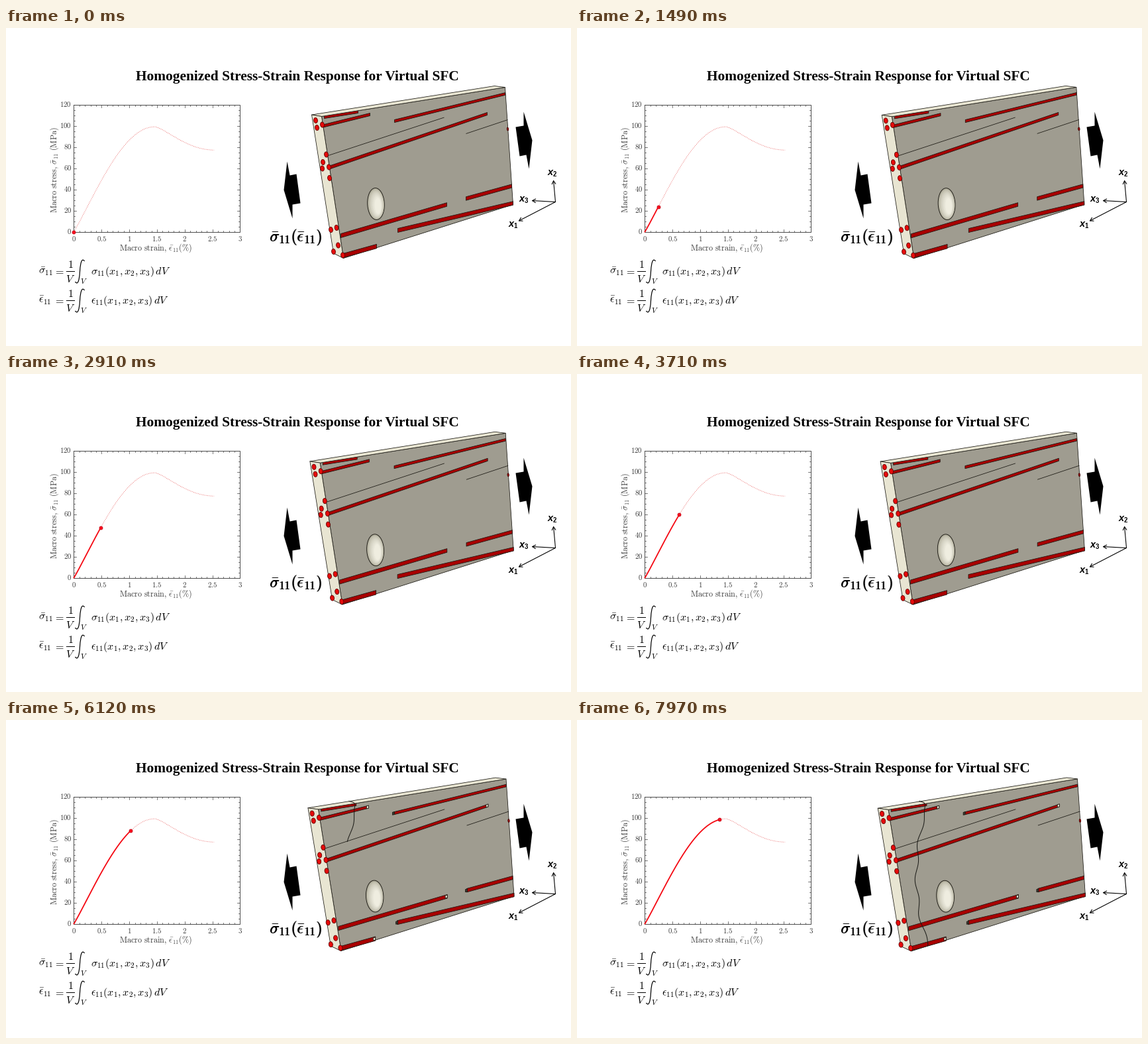
These frames come from a looping animation (853 by 480 pixels, 8 s). A matplotlib script:

```python
import numpy as np
import matplotlib.pyplot as plt
from matplotlib.animation import FuncAnimation
from matplotlib.colors import to_rgb
from matplotlib.patches import PathPatch, Polygon
from matplotlib.path import Path

W, H, DPI = 853, 480, 64
FRAMES, INTERVAL, POSES = 200, 40, 107
PX = 72 / DPI  # points per pixel

INK, GRAY, EDGE = "black", "#3c3c3c", "#1c1a14"
FACE, CREAM, DARK_RED, RED = "#9f9c90", "#e8e5d2", "#a80000", "#e60a0a"

fig = plt.figure(figsize=(W / DPI, H / DPI), dpi=DPI, facecolor="white")
ax = fig.add_axes([0, 0, 1, 1])
ax.set_xlim(-0.5, W - 0.5)  # whole numbers fall on pixel centres
ax.set_ylim(H - 0.5, -0.5)
ax.axis("off")


def line(xs, ys, color=INK, width=1.0, **kw):
    return ax.plot(xs, ys, color=color, lw=width * PX, **kw)[0]


def text(x, y, s, size, color=INK, va="baseline", **kw):
    return ax.text(x, y, s, fontsize=size * PX, color=color, va=va,
                   math_fontfamily="cm", **kw)


# ---------- title ----------
text(439, 78, "Homogenized Stress-Strain Response for Virtual SFC", 21.33,
     ha="center", family="Liberation Serif", weight="bold")

# ---------- chart ----------
LEFT, RIGHT, TOP, BOTTOM = 102, 353, 115, 307
PEAK, LAST = 1.46, 2.53


def to_px(strain, stress):
    return LEFT + (RIGHT - LEFT) * strain / 3, BOTTOM + (TOP - BOTTOM) * stress / 120


def stress_at(strain):
    """Sine-like rise to 99 MPa, then a softening tail that levels out at 77 MPa."""
    rise = 99 * np.sin(np.pi / 2 * np.clip(strain / PEAK, 0, 1)) ** 1.06
    tail = np.clip((strain - PEAK) / 1.09, 0, 1) ** 0.7
    return np.where(strain < PEAK, rise, 88 + 11 * np.cos(np.pi * tail))


def curve(end, n=300):
    strain = np.linspace(0, end, n)
    return to_px(strain, stress_at(strain))


line([LEFT, RIGHT, RIGHT, LEFT, LEFT], [TOP, TOP, BOTTOM, BOTTOM, TOP], GRAY, 0.9)
for i in range(1, 30):
    x, size = to_px(i / 10, 0)[0], 2 if i % 5 else 4
    line([x, x], [BOTTOM, BOTTOM - size], GRAY, 0.7)
    line([x, x], [TOP, TOP + size], GRAY, 0.7)
for i in range(1, 24):
    y, size = to_px(0, 5 * i)[1], 2 if i % 4 else 4
    line([LEFT, LEFT + size], [y, y], GRAY, 0.7)
    line([RIGHT, RIGHT - size], [y, y], GRAY, 0.7)
for i in range(7):
    x, y = to_px(i / 2, 20 * i)
    text(x, 321, f"${i / 2:g}$", 10.8, GRAY, ha="center")
    text(98.5, y + 3.7, f"${20 * i}$", 10.8, GRAY, ha="right")
text(225.5, 335, r"$\mathrm{Macro\ strain},\,\bar{\epsilon}_{11}(\%)$", 12.2, GRAY,
     ha="center")
text(72.5, 214, r"$\mathrm{Macro\ stress},\,\bar{\sigma}_{11}\ (\mathrm{MPa})$", 12.2,
     GRAY, va="center", ha="center", rotation=90)

line(*curve(LAST), "#e95a5a", 0.9, linestyle=(0, (1, 1.7)))
trace = line([], [], "#f50a14", 1.8, zorder=5)
head = line([], [], marker="o", markersize=5 * PX, markerfacecolor="#ff1020",
            markeredgecolor="#c00010", markeredgewidth=0.9, zorder=6)


# ---------- formulas ----------
def integral_sign(x, y):
    half = np.array([(7, -15.5), (4, -20), (1, -17)])
    verts = np.vstack([half, [(0, 0)], -half[::-1]]) + (x, y)
    ax.add_patch(PathPatch(Path(verts, [Path.MOVETO] + [Path.CURVE4] * 6),
                           fill=False, lw=1.2 * PX))


def average(symbol, y):
    text(49, y, rf"$\bar{{{symbol}}}_{{11}}$", 16)
    text(80, y, "$=$", 16, ha="center")
    text(97, y - 10, "$1$", 16, ha="center")
    text(97, y + 12, "$V$", 16, ha="center")
    line([91, 103], [y - 5, y - 5])
    integral_sign(111, y - 4)
    text(111.5, y + 15, "$V$", 11.5)
    text(128, y, rf"${symbol}_{{11}}(x_1,x_2,x_3)\,dV$", 16)


average(r"\sigma", 371)
average(r"\epsilon", 415)
for shift in (0, 0.7):  # doubled for a heavier weight
    text(397 + shift, 322, r"$\bar{\sigma}_{11}(\bar{\epsilon}_{11})$", 23.5)

# ---------- load arrows and axes triad ----------
pull = np.array([(424, 201), (428, 222), (438, 220), (444, 264), (432, 266), (432, 287),
                 (419, 244)])
for arrow in (pull, (1213, 413) - pull):
    ax.add_patch(Polygon(arrow, facecolor=INK, lw=0))

for digit, tip, (x, y) in ((1, (773, 291), (758, 299)), (2, (826, 229), (817, 221)),
                           (3, (793, 260), (774, 262))):
    ax.annotate("", xy=tip, xytext=(829, 262),
                arrowprops=dict(arrowstyle="->,head_length=0.35,head_width=0.2",
                                mutation_scale=14 * PX, lw=1.1 * PX, shrinkA=0, shrinkB=0))
    font = dict(family="Liberation Sans", weight="bold")
    text(x, y, "x", 14.5, style="italic", **font)
    text(x + 8, y + 2, str(digit), 9.5, **font)

# ---------- composite block ----------
shapes = []


def warp(points, p):
    """Stretch the block: the pull grows towards the left end as p goes to 1."""
    q = ((770 - points[:, :1]) / 310) ** 2
    return points + p * np.hstack([2 - 9.4 * q, 2.8 * q - 0.6])


def solid(points, color, edge=EDGE, width=0.8, zorder=2):
    patch = ax.add_patch(Polygon(points, facecolor=color, edgecolor=edge, lw=width * PX,
                                 joinstyle="round", zorder=zorder))
    shapes.append((patch, np.array(points, float)))
    return patch


def oval(cx, cy, rx, ry, color, tilt=-0.1, **kw):
    a = np.linspace(0, 2 * np.pi, 40, endpoint=False)
    x, y = rx * np.cos(a), ry * np.sin(a)
    c, s = np.cos(tilt), np.sin(tilt)
    return solid(np.column_stack([cx + c * x - s * y, cy + s * x + c * y]), color, **kw)


def cut(x, y):
    oval(x, y, 2.9, 4.1, RED, tilt=-0.15, edge="#5a0000", zorder=4)


def fibre(x0, y0, x1, y1):
    h0, h1 = (1.3 + y / 180 for y in (y0, y1))
    solid([(x0, y0 - h0), (x1, y1 - h1), (x1, y1 + h1), (x0, y0 + h0)], DARK_RED)


def gap(x, y, color):
    """Opening left by a fibre end that slides out of the matrix."""
    return solid([(x, y - 2), (x + 3, y - 2.8), (x + 3, y + 1.2), (x, y + 2)], color,
                 zorder=3)


back, front = (461, 130.5), (476, 133)
right, low = (753, 89), (509, 347)
solid([front, right, (765, 266), low], FACE)

gaps = []
for x0, y0, x1, y1 in ((478, 147.5, 549, 130), (488, 210, 726, 129), (505, 313, 665, 266),
                       (509, 343, 559, 329), (480, 134, 531, 126), (586, 140, 753, 99),
                       (694, 257, 763, 238), (591, 305, 765, 264)):
    fibre(x0, y0, x1, y1)
    if x0 > 550:
        gaps.append(gap(x0 - 2, y0 + 0.5, "#3a3831"))
    elif x1 > 540:
        gaps.append(gap(x1 - 3, y1 + 0.7, CREAM))

solid([back, (737, 87), right, front], CREAM, zorder=3)
solid([back, front, low, (494, 339.5)], CREAM, zorder=3)
for crevice in ([(486, 192), (661, 134.5)], [(694, 159), (757, 138)]):
    solid(crevice, "none")

for x, y in ((467, 139), (469, 150), (477, 145.5), (483, 190.5), (478, 202), (487, 209.5),
             (477, 211.5), (488, 226), (490, 304), (498.5, 301), (501, 327.5), (494, 337),
             (508, 342.5)):
    cut(x, y)
oval(757, 152, 1.2, 2.4, DARK_RED, edge="#3a0000")

# void, lit from the lower right
dark, light = np.array(to_rgb("#aeab99")), np.array(to_rgb("#efede0"))
for t in np.linspace(0, 1, 8):
    oval(558 + 3 * t, 265 + 3 * t, 12.8 - 8 * t, 24 - 12 * t, dark + (light - dark) * t ** 0.6,
         tilt=-0.05, width=0 if t else 0.9)

crack = line([], [], "#1a1a16", 1, zorder=4)


def crack_to(p):
    """Meandering crack that starts at the top edge and speeds up on its way down."""
    if p < 0.53:
        return [], []
    grow = min((p - 0.53) / 0.42, 1)
    y = np.linspace(122, 150 + 190 * grow ** 3, 150)
    s = (y - 235) / 100
    x = 512 + 15 * s ** 2 + s ** 3 + 2.3 * np.cos(2 * np.pi * (y - 213) / 56)
    return x - 12 * np.exp((122 - y) / 2) + 5 * (1 - p), y


def update(frame):
    p = frame * POSES // FRAMES / (POSES - 1)
    xs, ys = curve(1.343 * p)
    trace.set_data(xs, ys)
    head.set_data(xs[-1:], ys[-1:])
    for patch, base in shapes:
        patch.set_xy(warp(base, p))
    for patch in gaps:
        patch.set_visible(p >= 0.6)
    crack.set_data(*crack_to(p))
    return []


anim = FuncAnimation(fig, update, frames=FRAMES, interval=INTERVAL, repeat=True,
                     repeat_delay=0, init_func=lambda: update(0), blit=False)
plt.show()
```
